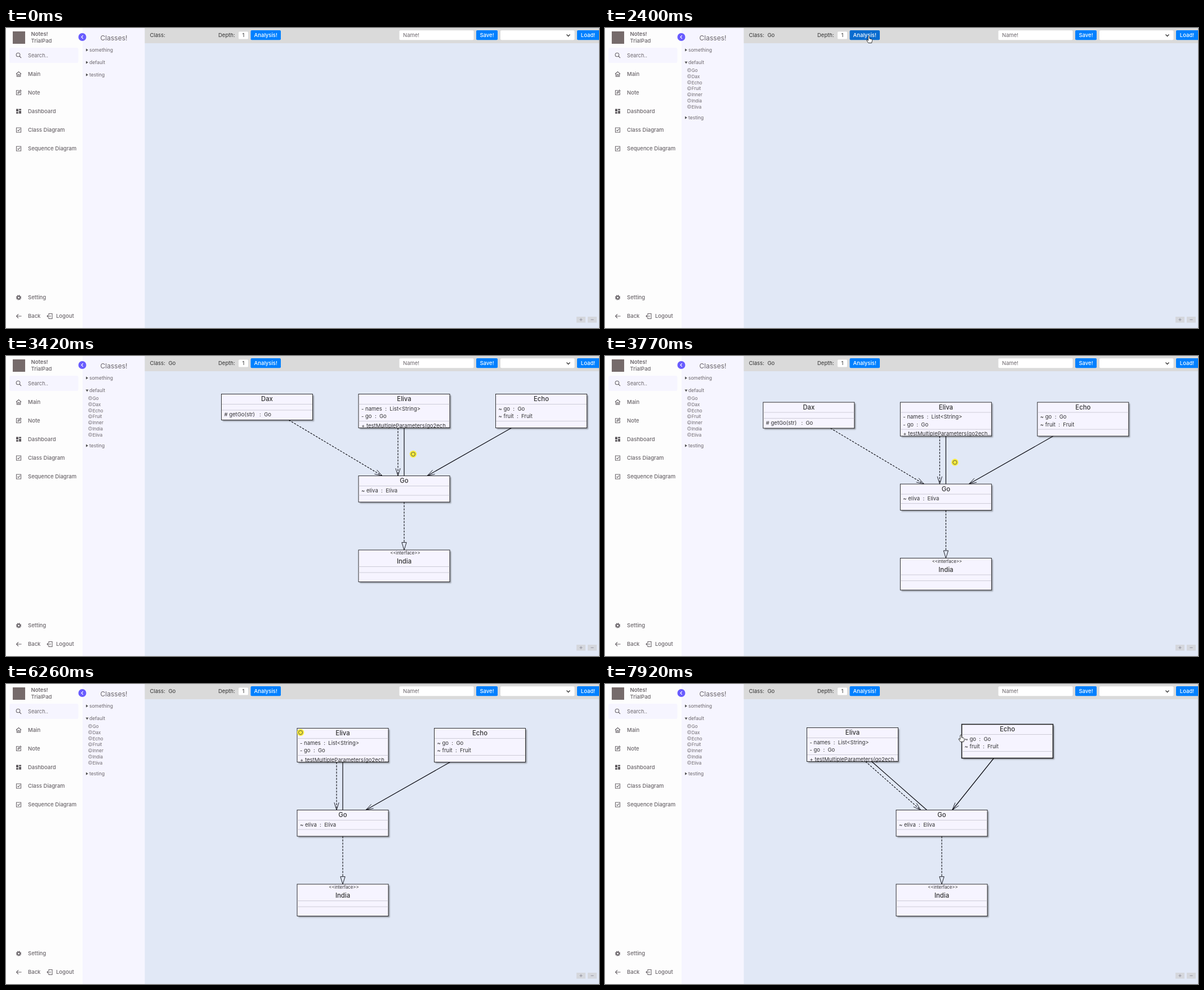
These frames come from a looping animation (1053 by 532 pixels, 7.99 s). An HTML page:

```html
<!DOCTYPE html>
<html lang="en">
<head>
<meta charset="utf-8">
<title>Class diagram</title>
<style>
html, body { margin: 0; width: 100%; height: 100%; overflow: hidden; background: #e1e8f6; }
svg { display: block; width: 100vw; height: 100vh; }
text { font-family: Inter, "Open Sans", sans-serif; font-size: 9.5px; fill: #6b666b; white-space: pre; }
.mid { text-anchor: middle; }
.medium { font-weight: 500; }
.bold { font-weight: 600; }
.dark { fill: #333; }
.light { fill: #fff; font-weight: 500; }
.icon { fill: none; stroke: #6b666b; stroke-width: 1.1; }
.badge { fill: none; stroke: #6b666b; stroke-width: .8; }
.edge { fill: none; stroke: #0b0b12; stroke-width: 1.2; }
.dash { stroke-dasharray: 3.6 2; stroke-width: 1.1; }
.head { stroke-width: .9; fill: none; stroke: #0b0b12; }
.card { fill: #f6f4ff; stroke: #1c1c1c; }
.rule { stroke: #c9c8d3; stroke-width: .9; }
</style>
</head>
<body>
<svg viewBox="0 0 1053 532">
  <defs>
    <clipPath id="canvasClip"><path d="M247 27H1053V532H247z"/></clipPath>
    <filter id="soft" x="-5%" y="-15%" width="110%" height="130%"><feGaussianBlur stdDeviation=".9"/></filter>
  </defs>
  <path fill="#e1e8f6" d="M247 27H1053V532H247z"/>
  <g id="diagram" clip-path="url(#canvasClip)"><g id="pan"></g></g>
  <path fill="#fdfdfd" d="M0 0H136V532H0z"/>
  <path fill="#f6f5ff" d="M136 0H246.5V532H136z"/>
  <path fill="#dadada" d="M246.5 0H1053V27H246.5z"/>

  <path fill="#766b6b" d="M12 6H34V28H12z"/>
  <rect x="6" y="35" width="122.5" height="27" rx="3" fill="#f6f5ff"/>
  <circle cx="135.5" cy="16" r="7" fill="#695cfe"/>
  <path d="M136.8 13.2L134 16L136.8 18.8" fill="none" stroke="#fff" stroke-width="1.2"/>
  <g class="icon">
    <circle cx="21.5" cy="47.5" r="3.3"/><path d="M24 50L27 53"/>
    <path d="M18 81.5L22.5 77.5L27 81.5M19.3 81V86H25.7V81M21.3 86V82.5H23.7V86"/>
    <path d="M23 110.8H18.5V118.5H26.3V114M21 116L21.5 114L25.5 110L27 111.5L23 115.5Z"/>
    <path id="check" d="M18.5 177H26.5V185H18.5zM20.5 181L22 182.5L25 179.2"/>
    <use href="#check" y="33"/>
    <circle cx="22.5" cy="478" r="2.6" stroke-width="2"/>
    <circle cx="22.5" cy="478" r="4" stroke-width="1.4" stroke-dasharray="1.6 1.54"/>
    <path d="M27.5 511H18.5M22 507.5L18.5 511L22 514.5"/>
    <path d="M76 509V506.5H82V515.5H76V513M80 511H73M75 509L73 511L75 513"/>
  </g>
  <path fill="#5d595d" d="M18 143.5H22V148H18zM23 143.5H27V146H23zM18 149H22V151.8H18zM23 147H27V151.8H23z"/>

  <g fill="#0080ff">
    <rect x="434.5" y="4" width="53.5" height="17.3" rx="2" id="analysis"/>
    <rect x="835" y="4" width="38" height="17.3" rx="2"/>
    <rect x="1014" y="4" width="42" height="17.3" rx="2"/>
  </g>
  <g fill="#fff">
    <rect x="413" y="6.5" width="17" height="13" rx="1.5"/>
    <rect x="698.5" y="4.3" width="132" height="17" rx="2"/>
    <rect x="878" y="4.3" width="131.5" height="17" rx="2"/>
  </g>
  <path d="M995.5 11.5L998.5 14.5L1001.5 11.5" fill="none" stroke="#333" stroke-width="1.3"/>
  <path fill="#d5d7dd" d="M1013 512H1029V522.5H1013zM1033 512H1049V522.5H1033z"/>
  <path d="M1018.5 517.2H1023.5M1021 514.7V519.7M1038.5 517.2H1043.5" stroke="#8f8f9c"/>

  <rect id="rowHover" x="136" width="110.5" fill="#ebe9f8"/>
  <g id="labels"></g>
  <g id="tree"></g>
  <g id="cursor">
    <circle id="press" r="6.2" fill="#f8ec3c"/>
    <path id="fist" fill="none" stroke="#444" stroke-width=".9"
      d="M-3.3 -1Q-3 -3.3 -1.5 -2.8Q0 -4 1 -2.9Q3 -3.4 3.3 -1V1Q3 3.6 0 3.6Q-2.5 3.6 -3.6 .8Z"/>
    <path id="hand" fill="#fff" stroke="#222" stroke-width=".9"
      d="M-1.2 1Q0 -.8 1.2 1V4.8L5 5.8Q6.3 6.4 6 8.3L5 12.5H-.8L-3.8 8.2Q-4.3 6.6 -2.8 7L-1.2 8.3Z"/>
  </g>
</svg>
<script>
const LOOP = 7990;
const $ = id => document.getElementById(id);
const show = (el, on) => el.setAttribute('display', on ? 'inline' : 'none');
const move = (el, x, y) => el.setAttribute('transform', `translate(${x} ${y})`);
const text = (x, y, str, cls = '', size = 9.5) =>
  `<text x="${x}" y="${y}" class="${cls}" style="font-size:${size}px">${str.replace(/</g, '&lt;')}</text>`;

// ---- page labels and class tree ----
const menu = ['Main', 'Note', 'Dashboard', 'Class Diagram', 'Sequence Diagram'];
$('labels').innerHTML =
  text(44.5, 13.5, 'Notes!', 'bold') + text(44.5, 25.5, 'TrialPad', 'medium') +
  text(39, 52, 'Search..', '', 9.2) +
  menu.map((name, i) => text(39, 84.5 + 33.1 * i, name, 'medium')).join('') +
  text(39, 481, 'Setting', 'medium') + text(39, 514, 'Back', 'medium') + text(89, 514, 'Logout', 'medium') +
  text(191.5, 21.5, 'Classes!', 'mid', 12) +
  text(255.5, 16, 'Class:', 'dark') + text(377, 16, 'Depth:', 'dark') +
  text(421.5, 16, '1', 'mid dark') + text(705, 16.3, 'Name!') +
  text(461.2, 16, 'Analysis!', 'mid light') + text(854, 16, 'Save!', 'mid light') +
  text(1033.5, 16, 'Load!', 'mid light') +
  `<g id="chosen">${text(288.5, 16, 'Go', 'dark')}</g>`;

const closedMark = y => `<path d="M142 ${y - 2.5}L146 ${y}L142 ${y + 2.5}z" fill="#555"/>`;
const branch = (y, name) => text(148, y + 3, name, '', 8.5);
const leaf = (name, i) => {
  const y = 75 + i * 10.8;
  return `<circle cx="149.5" cy="${y - .3}" r="2.9" class="badge"/>` +
    text(149.5, y + 1.3, name === 'India' ? 'i' : 'c', 'mid', 5) + text(153.7, y + 3, name, '', 8);
};
const classes = ['Go', 'Dax', 'Echo', 'Fruit', 'Inner', 'India', 'Eliva'];
$('tree').innerHTML =
  closedMark(39) + branch(39, 'something') + branch(61, 'default') +
  `<g id="closed">${closedMark(61)}</g>` +
  `<g id="open"><path d="M141.5 59.5H146.5L144 63.5z" fill="#555"/>${classes.map(leaf).join('')}</g>` +
  `<g id="testing">${closedMark(83)}${branch(83, 'testing')}</g>`;

// ---- diagram ----
const W = 162, LEFT = 273.5, TOP = 78.5, COLUMN = 243.5;
const cards = {
  dax: { col: 0, y: TOP, h: 46, title: 'Dax', fields: [], methods: ['# getGo(str)   :  Go'] },
  eliva: { col: 1, y: TOP, h: 60, title: 'Eliva', fields: ['- names  :  List<String>', '- go  :  Go'],
    methods: ['+ testMultipleParameters(go2ech...'] },
  echo: { col: 2, y: TOP, h: 60, title: 'Echo', fields: ['~ go  :  Go', '~ fruit  :  Fruit'], methods: [] },
  go: { col: 1, y: TOP + 145, h: 46.5, title: 'Go', fields: ['~ eliva  :  Eliva'], methods: [] },
  india: { col: 1, y: TOP + 276.5, h: 56.5, title: 'India', fields: [], methods: [], stereotype: '<<interface>>' }
};
for (const c of Object.values(cards)) {
  c.x = LEFT + COLUMN * c.col;
  c.home = [c.x, c.y];
}
const edges = [
  { from: 'dax', to: 'go', dash: true, head: 'open' },
  { from: 'eliva', to: 'go', dash: true, head: 'open', shift: -11 },
  { from: 'eliva', to: 'go' },
  { from: 'echo', to: 'go', head: 'open' },
  { from: 'go', to: 'india', dash: true, head: 'triangle' }
];

function cardMarkup([id, c]) {
  const headY = c.stereotype ? 29.5 : 18;
  const bodyY = headY + Math.max(10.5, 3 + 13.5 * c.fields.length);
  const lines = (list, y) => list.map((s, i) => text(5, y + 11 + 13.5 * i, s, 'dark')).join('');
  return `<g id="${id}">
    <rect x="2.2" y="2.2" width="${W}" height="${c.h}" opacity=".38" filter="url(#soft)"/>
    <rect class="card" width="${W}" height="${c.h}"/>
    <path class="rule" d="M.5 ${headY}H${W - .5}M.5 ${bodyY}H${W - .5}"/>
    ${c.stereotype ? text(W / 2 + 2, 8.3, c.stereotype, 'mid dark', 7.8) : ''}
    ${text(W / 2, headY - 5.3, c.title, 'mid dark medium', 11.3)}
    ${lines(c.fields, headY)}${lines(c.methods, bodyY)}
  </g>`;
}
const handle = (x, y) => `<rect x="${x - 2}" y="${y - 2}" width="4" height="4"/>`;
const { x: hx, y: hy, h: hh } = cards.dax;
$('pan').innerHTML =
  edges.map((e, i) => `<g id="edge${i}"><path class="edge${e.dash ? ' dash' : ''}"/><path class="head"/></g>`).join('') +
  Object.entries(cards).map(cardMarkup).join('') +
  `<g id="handles" fill="#fff" stroke="#222">${handle(hx, hy)}${handle(hx + W, hy)}${
    handle(hx, hy + hh)}${handle(hx + W, hy + hh)}</g>`;

// point where the line from card a towards card b leaves a
function border(a, b) {
  const ax = a.x + W / 2, ay = a.y + a.h / 2;
  const dx = b.x + W / 2 - ax, dy = b.y + b.h / 2 - ay;
  const s = Math.min(W / 2 / Math.abs(dx || 1e-6), a.h / 2 / Math.abs(dy || 1e-6));
  return [ax + dx * s, ay + dy * s];
}
function drawEdge({ from, to, head, shift = 0 }, i) {
  const [x1, y1] = border(cards[from], cards[to]);
  const [x2, y2] = border(cards[to], cards[from]);
  const angle = Math.atan2(y1 - y2, x1 - x2);
  const back = (length, turn = 0) =>
    `${x2 + length * Math.cos(angle + turn)} ${y2 + length * Math.sin(angle + turn)}`;
  const [line, tip] = $('edge' + i).children;
  const closed = head === 'triangle';
  line.setAttribute('d', `M${x1} ${y1}L${back(closed ? 13 : 0)}`);
  if (head) tip.setAttribute('d', `M${back(14, .3)}L${x2} ${y2}L${back(14, -.3)}${closed ? 'Z' : ''}`);
  move($('edge' + i), shift, 0);
}

// ---- motion: the cursor eases through its moves, dragged things follow it ----
const moves = [ // start, end, x, y
  [70, 830, 165, 82], [900, 1060, 159, 62], [1400, 1640, 158, 76], [1770, 2400, 468.5, 14],
  [2670, 2950, 828, 151], [3000, 3420, 723, 174], [3420, 3630, 643, 199], [3630, 3840, 614, 185],
  [4040, 4820, 289, 93], [4820, 4960, 444, 146.5], [5360, 6130, 533, 86], [6200, 6600, 374.5, 85],
  [6720, 7120, 764, 91], [7160, 7360, 722, 79], [7360, 7600, 650, 75], [7600, 7740, 637, 84],
  [7850, 7920, 632, 90]
];
const PAN = [3000, 3840], ELIVA = [6200, 6720], ECHO = [7160, 7850], CLICK = [4820, 4890];
const CARD_LAG = 110;
const clamp = (v, lo, hi) => Math.min(hi, Math.max(lo, v));
const during = (t, [from, to]) => t >= from && t < to;

function cursorAt(t) {
  let x = 988, y = 506;
  for (const [start, end, toX, toY] of moves) {
    const k = clamp((t - start) / (end - start), 0, 1), eased = k * k * (3 - 2 * k);
    x += (toX - x) * eased;
    y += (toY - y) * eased;
  }
  return [x, y];
}
function dragged([from, to], t) {
  const [x0, y0] = cursorAt(from), [x, y] = cursorAt(clamp(t, from, to));
  return [x - x0, y - y0];
}
function place(card, span, t) {
  const [dx, dy] = dragged(span, t - CARD_LAG);
  card.x = card.home[0] + dx;
  card.y = card.home[1] + dy;
}

function render(t) {
  const [cx, cy] = cursorAt(t);
  const opened = t >= 1200, drawn = t >= 2540, removed = t >= 5360;
  const pressed = [PAN, ELIVA, ECHO, CLICK].some(span => during(t, span));

  show($('open'), opened);
  show($('closed'), !opened);
  move($('testing'), 0, opened ? 76 : 0);
  show($('chosen'), t >= 1770);
  const onButton = cy < 22 && cx > 434 && cx < 488;
  $('analysis').setAttribute('fill', onButton ? '#0a6ccf' : '#0080ff');

  const onLeaf = opened && cy > 70;
  show($('rowHover'), t >= 70 && cx < 246 && cy > 53 && cy < 92);
  $('rowHover').setAttribute('y', onLeaf ? 70 : cy > 72 ? 75 : 53);
  $('rowHover').setAttribute('height', onLeaf ? 10.5 : 17);

  show($('diagram'), drawn);
  const [endX, endY] = dragged(PAN, LOOP), [panX, panY] = dragged(PAN, t);
  move($('pan'), panX - endX, panY - endY);
  place(cards.eliva, ELIVA, t);
  place(cards.echo, ECHO, t);

  let onCard = false;
  for (const [id, c] of Object.entries(cards)) {
    const over = drawn && !pressed && !(removed && id === 'dax') &&
      cx > c.x - 4 && cx < c.x + W && cy > c.y && cy < c.y + c.h;
    const keepsFocus = id === 'eliva' && during(t, [ELIVA[1], ECHO[1]]);
    onCard = onCard || over;
    move($(id), c.x, c.y);
    $(id).children[1].setAttribute('stroke-width', over || keepsFocus ? 1.6 : .9);
  }
  edges.forEach(drawEdge);
  show($('dax'), !removed);
  show($('edge0'), !removed);
  show($('handles'), t >= CLICK[0] && !removed);

  const onLink = during(t, [CLICK[1], 5400]);
  const onCanvas = cx > 247 && cy > 27;
  const pointing = !pressed && (!onCanvas || onCard || onLink);
  show($('cursor'), t >= 70);
  show($('press'), pressed);
  show($('fist'), !pointing);
  show($('hand'), pointing);
  move($('cursor'), cx, cy);
}

const start = performance.now();
function tick() {
  render((performance.now() - start) % LOOP);
  requestAnimationFrame(tick);
}
tick();
</script>
</body>
</html>
```
